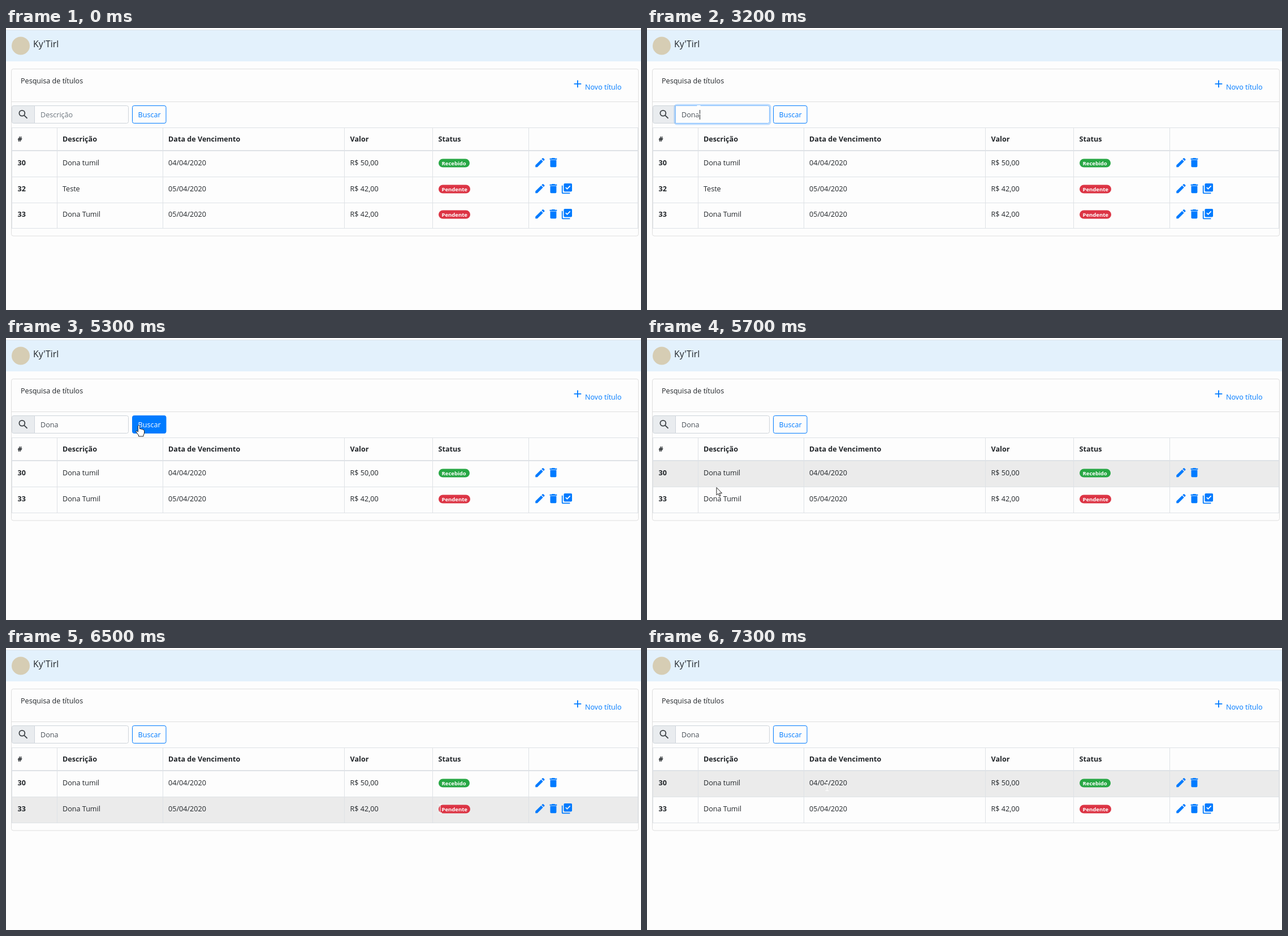
These frames come from a looping animation (1123 by 499 pixels, 8000 ms). An HTML page:

```html
<!DOCTYPE html>
<html lang="pt-BR">
<head>
<meta charset="utf-8">
<title>Pesquisa de títulos</title>
<style>
  html, body { margin: 0; width: 100%; height: 100%; overflow: hidden; background: #fdfdfd; }
  svg { display: block; }
  text { font: 12.6px "Open Sans", "Noto Sans", sans-serif; fill: #212529; white-space: pre; }
  .bold { font-weight: 700; }
  .brand { font-size: 15.8px; }
  .badge { font-size: 9.5px; font-weight: 700; fill: #fff; }
  .blue { fill: #007bff; }
  .line { stroke: #dee2e6; fill: none; }
</style>
</head>
<body>
<svg id="stage" width="1123" height="499" viewBox="0 0 1123 499">
  <defs>
    <path id="edit" d="M3 17.2V21h3.8L17.8 9.9 14.1 6.2zM20.7 7q.6-.7 0-1.4l-2.3-2.3q-.7-.6-1.4 0l-1.9 1.8 3.8 3.8z"/>
    <path id="trash" d="M6 19q0 2 2 2h8q2 0 2-2V7H6zM19 4h-3.5l-1-1h-5l-1 1H5v2h14z"/>
    <path id="done" d="M20 2H8Q6 2 6 4v12q0 2 2 2h12q2 0 2-2V4q0-2-2-2zM12.5 14 9 10.5l1.4-1.4 2.1 2.1L17.6 6 19 7.4zM4 6H2v14q0 2 2 2h14v-2H4z"/>
    <path id="plus" d="M19 13h-6v6h-2v-6H5v-2h6V5h2v6h6z"/>
    <path id="lens" d="M14 14l5.7 5.7M15 9.5a5.5 5.5 0 1 0-11 0a5.5 5.5 0 1 0 11 0z" fill="none" stroke="#3b4045" stroke-width="2"/>
  </defs>

  <rect y="3" width="1123" height="56" fill="#e3f1fc"/>
  <path class="line" d="M0 3.5H1123"/>
  <circle cx="26" cy="31.5" r="16" fill="#d6cdb4"/>
  <text class="brand" x="48" y="34">Ky'Tirl</text>

  <rect id="card" x="9.5" y="72.5" width="1109" rx="3.5" fill="none" stroke="#dfdfdf"/>
  <path d="M10 130.5H1118" stroke="#dfdfdf"/>
  <text x="26" y="98">Pesquisa de títulos</text>
  <use href="#plus" class="blue" transform="translate(1000 88) scale(.91)"/>
  <text class="blue" x="1024" y="109">Novo título</text>

  <path d="M50.5 137.5H13.5q-3 0-3 3v25q0 3 3 3h37z" fill="#e9ecef" stroke="#ced4da"/>
  <use href="#lens" transform="translate(19.8 142.2) scale(.9)"/>
  <rect id="inputRing" x="49" y="136" width="169" height="34" rx="4" fill="none" stroke="#007bff" stroke-opacity=".25" stroke-width="3"/>
  <path id="input" d="M50.5 137.5H213.5q3 0 3 3v25q0 3-3 3H50.5z" fill="#fdfdfd"/>
  <text id="field" x="61" y="158"></text>
  <rect id="caret" y="145" width="1" height="17" fill="#212529"/>

  <rect id="buttonRing" x="222" y="136" width="62.5" height="34" rx="4" fill="none" stroke="#007bff" stroke-opacity=".4" stroke-width="3"/>
  <rect id="button" x="223.5" y="137.5" width="59.5" height="31" rx="3" fill="#007bff" stroke="#007bff"/>
  <text id="buttonText" x="233.5" y="158">Buscar</text>

  <g id="rows"></g>
  <path id="grid" class="line"/>
  <g id="header"></g>

  <g id="arrow"><path d="M.5 0V13.5L3.5 10.8 5.6 15.6 7.6 14.7 5.6 10.1H10z" fill="#fff" stroke="#222"/></g>
  <g id="beam"><path d="M-3-7.5H3M0-7.5V7.5M-3 7.5H3" stroke="#fff" fill="none"/></g>
  <g id="hand"><path d="M-1.5 1.5q1.5-2.5 3 0V7q2-1.2 3 .5 2-.7 2.7.8 2.2-.5 2.3 2V14q-.2 2-1.5 4v2H-.5v-2L-5 12q-.5-2 1.2-1.7L-1.5 12z" fill="#fff" stroke="#222"/></g>
</svg>
<script>
const LOOP = 8000, STEP = 100;
const SUBMIT = 4400, RELOAD = 4700;
const COLUMNS = [20.5, 100, 287, 608.5, 764.5];
const OFFSETS = [0, 46, 91];
const KEYS = [[2700, 'D'], [2900, 'Do'], [3100, 'Don'], [3200, 'Dona']];
const TITLES = [
  ['30', 'Dona tumil', '04/04/2020', 'R$ 50,00', true],
  ['32', 'Teste', '05/04/2020', 'R$ 42,00', false],
  ['33', 'Dona Tumil', '05/04/2020', 'R$ 42,00', false]
];
// time, x, y, shape of the pointer from this time on
const POINTER = [
  [1000, 91.5, 145, 'beam'], [3600, 91.5, 145, 'beam'],
  [4000, 205, 152, 'beam'], [4100, 228, 154, 'hand'], [4200, 235, 154, 'hand'],
  [5400, 235, 154, 'hand'], [5500, 215, 173, 'arrow'], [5600, 165, 212, 'arrow'],
  [5700, 122.5, 264.5, 'arrow'], [5800, 420, 281, 'beam'], [5900, 700, 286, 'beam'],
  [6300, 700, 286, 'beam'], [6500, 768, 284, 'beam'], [6600, 610, 272, 'arrow'],
  [6800, 346, 252, 'arrow'], [6900, 346, 252, 'arrow'],
  [7100, 331, 247, 'beam'], [7300, 318.5, 245, 'beam']
];

const $ = id => document.getElementById(id);
const set = (id, attrs) => {
  for (const name in attrs) $(id).setAttribute(name, attrs[name]);
};
const show = (id, on) => { $(id).style.display = on ? '' : 'none'; };
const clamp = v => Math.max(0, Math.min(1, v));
const text = (x, y, value, cls = '') => `<text class="${cls}" x="${x}" y="${y}">${value}</text>`;
const icon = (id, x) => `<use href="#${id}" class="blue" transform="translate(${x} 227.2) scale(.91)"/>`;

function rowMarkup([id, name, date, value, paid], i) {
  return `<g id="row${i}"><rect id="hover${i}" x="10" y="218" width="1108" height="45" fill="#ebebeb"/>` +
    text(COLUMNS[0], 243, id, 'bold') +
    [name, date, value].map((v, c) => text(COLUMNS[c + 1], 243, v)).join('') +
    `<rect x="765" y="231.5" width="${paid ? 55 : 56}" height="15" rx="7.5" fill="${paid ? '#28a745' : '#dc3545'}"/>` +
    text(770.5, 242.5, paid ? 'Recebido' : 'Pendente', 'badge') +
    icon('edit', 933.5) + icon('trash', 957) + (paid ? '' : icon('done', 981)) + '</g>';
}

$('rows').innerHTML = TITLES.map(rowMarkup).join('');
$('header').innerHTML = ['#', 'Descrição', 'Data de Vencimento', 'Valor', 'Status']
  .map((label, c) => text(COLUMNS[c], 201, label, 'bold')).join('');

function pointerAt(t) {
  if (t < POINTER[0][0]) return null;
  const next = POINTER.findIndex(p => p[0] > t);
  if (next < 0) return POINTER.at(-1).slice(1);
  const [t0, x0, y0, shape] = POINTER[next - 1], [t1, x1, y1] = POINTER[next];
  const k = (t - t0) / (t1 - t0);
  return [x0 + (x1 - x0) * k, y0 + (y1 - y0) * k, shape];
}

// Eased level that rises at one time and falls at another
const fade = (t, from, to) => {
  const ramp = at => clamp((t - at + 50) / 150);
  return t < from ? 0 : t < to ? ramp(from) : 1 - ramp(to);
};
const blend = (a, b, k) => `rgb(${a.map((v, i) => Math.round(v + (b[i] - v) * k))})`;

function drawSearch(t) {
  const focus = fade(t, 1500, SUBMIT);
  const typed = KEYS.filter(k => k[0] <= t).map(k => k[1]).pop();
  $('field').textContent = typed || 'Descrição';
  $('field').style.fill = typed ? '#495057' : '#6c757d';
  set('input', { stroke: blend([206, 212, 218], [128, 189, 255], focus) });
  set('inputRing', { opacity: focus });

  const lastKey = [1500, ...KEYS.map(k => k[0])].filter(k => k <= t).pop();
  show('caret', t >= 1500 && t < SUBMIT && Math.floor((t - lastKey) / 500) % 2 === 0);
  set('caret', { x: 61 + (typed ? Math.round($('field').getComputedTextLength()) : 0) });

  const hover = t < RELOAD ? fade(t, 4100, RELOAD) : fade(t, 5000, 5500);
  set('button', { 'fill-opacity': hover });
  $('buttonText').style.fill = blend([0, 123, 255], [255, 255, 255], hover);
  set('buttonRing', { opacity: t < RELOAD ? fade(t, SUBMIT, RELOAD) : 0 });
}

function drawTable(t, pointer) {
  const visible = t < RELOAD ? [0, 1, 2] : [0, 2];
  const bottom = 263.5 + OFFSETS[visible.length - 1];
  const pointed = pointer && t >= 5700 ? (pointer[1] < 265 ? 0 : 1) : -1;
  TITLES.forEach((_, i) => {
    const place = visible.indexOf(i);
    show('row' + i, place >= 0);
    show('hover' + i, place >= 0 && place === pointed);
    set('row' + i, { transform: `translate(0 ${OFFSETS[Math.max(0, place)]})` });
  });
  const across = [176.5, 216.5, 217.5, ...visible.map((_, i) => 263.5 + OFFSETS[i])];
  const down = [10.5, 90.5, 277.5, 598.5, 754.5, 924.5, 1117.5];
  set('grid', {
    d: across.map(y => `M10 ${y}H1118`).join('') + down.map(x => `M${x} 176V${bottom}`).join('')
  });
  set('card', { height: bottom + 13 - 72 });
}

function draw(now) {
  const t = Math.floor(now % LOOP / STEP) * STEP;
  const pointer = pointerAt(t);
  drawSearch(t);
  drawTable(t, pointer);
  for (const shape of ['arrow', 'beam', 'hand']) {
    show(shape, pointer && pointer[2] === shape);
    if (pointer) set(shape, { transform: `translate(${pointer[0]} ${pointer[1]})` });
  }
}

const start = performance.now();
function tick() {
  draw(performance.now() - start);
  requestAnimationFrame(tick);
}
tick();
</script>
</body>
</html>
```
